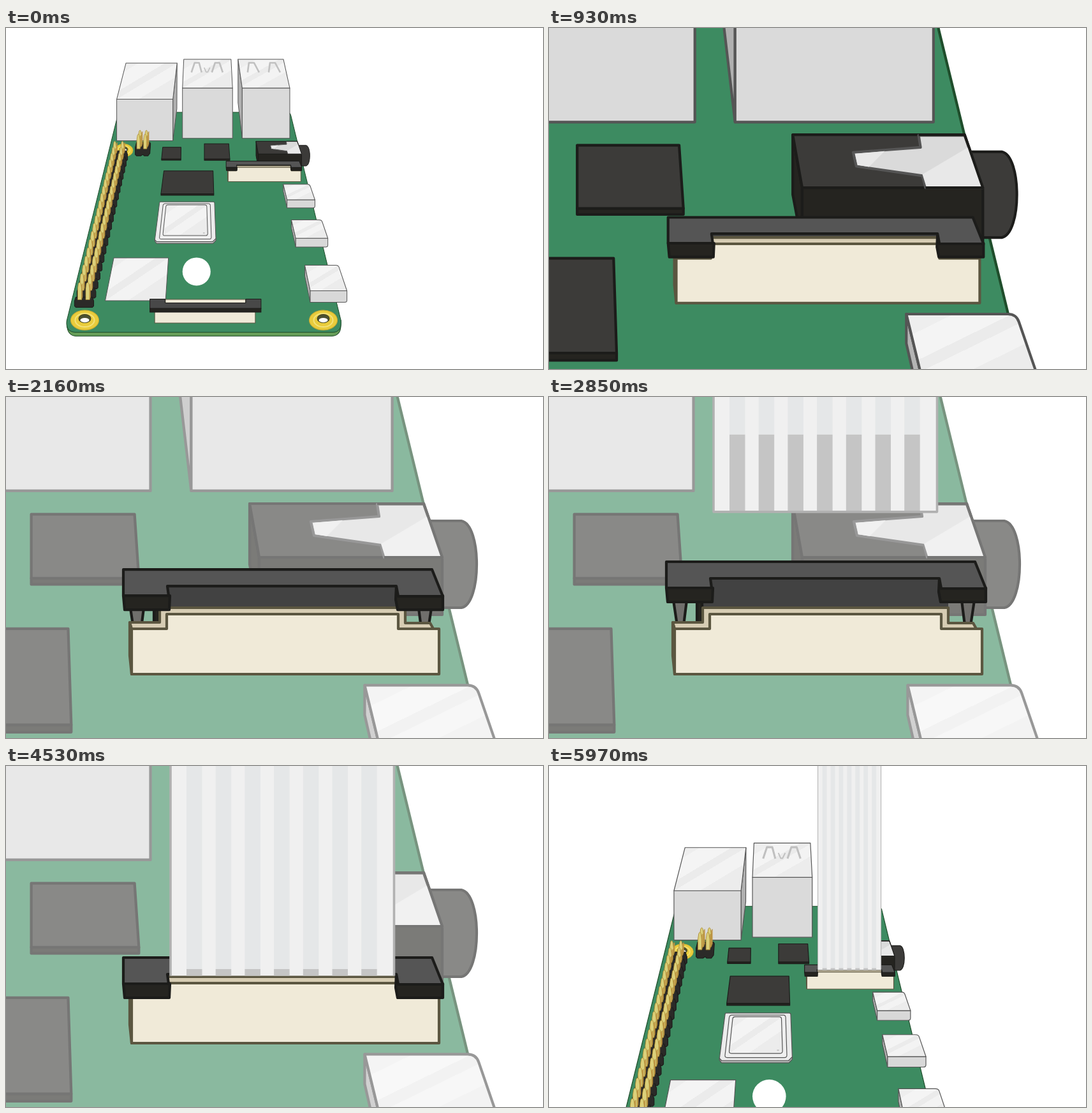
An HTML page for the animation above (6 s loop, 842 px wide and 534 px high).

```html
<!DOCTYPE html>
<html lang="en">
<head>
<meta charset="utf-8">
<title>Fitting a ribbon cable</title>
<style>
  html, body { margin: 0; width: 100%; height: 100%; overflow: hidden; background: #fff; }
  svg { display: block; width: 842px; height: 534px; }
</style>
</head>
<body>
<svg id="stage" viewBox="0 0 842 534" stroke-linejoin="round"></svg>
<script>
const GREY = '#555', BLACK = '#1c1c1a', FACE = '#3c3b39', SIDE = '#252420', OLIVE = '#5b5640';
const LOOP = 6000;

const path = (d, fill, stroke = GREY, extra = '') =>
  `<path d="${d}" fill="${fill}" stroke="${stroke}" ${extra}/>`;
const rect = (x, y, w, h, fill, extra = '') =>
  `<rect x="${x}" y="${y}" width="${w}" height="${h}" fill="${fill}" ${extra}/>`;
const ellipse = (cx, cy, rx, ry, fill, extra = '') =>
  `<ellipse cx="${cx}" cy="${cy}" rx="${rx}" ry="${ry}" fill="${fill}" ${extra}/>`;

// Groups drawn at a closer view, mapped back to board units.
const view = (scale, x, y, stroke, body) =>
  `<g transform="scale(${1 / scale}) translate(${x} ${y})" stroke-width="${stroke}">${body}</g>`;
const middle = body => view(2.194, 471.8, 215.5, 2.2, body);
const close = body => view(4.23, 1276.8, 582.8, 4.2, body);

function board() {
  const outline = 'M174 143Q177 132 183 132H440Q446 132 447 138L525 457Q527 476 512 476H109Q93 475 96 457Z';
  return path('M96 457V465Q97 481 110 482H511Q525 481 525 465V457Z', '#669d58', '#1f4d2b') +
    path(outline, '#3d8b61', '#1f4d2b');
}

function mount(x, y, size) {
  return `<g transform="translate(${x} ${y}) scale(${size})">` +
    ellipse(0, 0, 22, 15.5, '#e9cc3c', 'stroke="#cba92f"') +
    ellipse(0, 0, 15, 10.5, 'none', 'stroke="#f3e27a" stroke-width="2"') +
    ellipse(0, -2.5, 9.5, 6.5, '#4c5132', 'stroke="#3b3d20"') +
    ellipse(0, 0, 7, 3.6, '#fff') + '</g>';
}

function ports() {
  const prong = (a, b, c, d) =>
    path(`M${a} 69.5L${b} 54.5H${c}L${d} 69.5`, 'none', '#c0c0c0', 'stroke-width="2.6"');
  return path('M268.5 55L268.2 126L262 176.3V111.5Z', '#b0b0b0') +
    path('M174 111.5H262V176.3H174Z', '#dadada') +
    path('M188.5 55H268.5L262 111.5H174Z', 'url(#sheen)') +
    path('M277 94H355.4V172.5H277Z', '#dadada') +
    path('M279 49H353L355.4 94H277Z', 'url(#sheen)') +
    path('M364 49L370.5 94V172.5L364 117Z', '#b0b0b0') +
    path('M370.5 94H445V172.5H370.5Z', '#dadada') +
    path('M364 49H435L445 94H370.5Z', 'url(#sheen)') +
    prong(291, 296, 303, 307) + prong(323, 328, 335, 340) +
    path('M311 62L314 69H316.5L320 62', 'none', '#c0c0c0', 'stroke-width="1.6"') +
    prong(379, 381, 389, 397) + prong(412, 414, 422, 430);
}

function pin(x, y, w, h) {
  const r = w / 2;
  return path(`M${x + r} ${y + 4}L${x + r + 1.4} ${y + 2}V${y + h - 4}L${x + r} ${y + h}Z`, '#d5a257', '#a8862e', 'stroke-width=".5"') +
    path(`M${x - r} ${y + h}V${y + 9}L${x - r + 1} ${y + 2}Q${x} ${y - 2} ${x + r - 1} ${y + 2}L${x + r} ${y + 9}V${y + h}Z`,
      '#dcd07a', '#a8862e', 'stroke-width=".7"');
}

function header() {
  let out = '';
  for (let i = 0; i < 20; i++) {
    const u = i / 19, k = .78 * u + .22 * u * u;
    const x = 171 - 55 * k, y = 177 + 221 * k, gap = 12 + .5 * k, h = 19 + 8 * k;
    const base = y + h, left = x - 3 - 5 * k, right = x + gap + 8 + 1.5 * k;
    out += path(`M${left} ${base + 2}L${left + 2} ${base - 4}H${right - 2}L${right} ${base + 2}V${base + 10}L${right - 2} ${base + 12}H${left + 2}L${left} ${base + 10}Z`, '#2b2a28', BLACK) +
      pin(x, y, 5 + k, h) + pin(x + gap, y, 5 + k, h);
  }
  return out;
}

function smallHeader() {
  return path('M203 187L205 179H226L227 181L226 196L223 200H217L215 198L212 200H205L203 198Z', '#2b2a28', BLACK) +
    pin(210.5, 160, 5, 25) + pin(220.5, 160, 5, 25) +
    pin(208, 166, 5, 23) + pin(218.5, 166, 5, 23);
}

function chips() {
  const chip = (x1, x2, x3, x4, top, edge, bottom) =>
    path(`M${x4} ${edge}H${x3}V${bottom}H${x4}Z`, SIDE, BLACK) +
    path(`M${x1} ${top}H${x2}L${x3} ${edge}H${x4}Z`, FACE, BLACK);
  return middle(
    chip(68, 131, 130.5, 64, 194, 234, 238.5) +
    chip(211, 295, 298.5, 211, 182, 234, 239) +
    chip(72, 241, 243.5, 62, 275, 353, 359) +
    path('M41 510V516L47 524H241L250.5 514V506L240 517H47Z', '#b4b4b4') +
    path('M60 381H242Q246 381 246 385L250.5 507L240 517.5H47L41 511L57 385Q57.500 381 60 381Z', '#ececec') +
    path('M77 387H225Q231 387 231.500 393L235 502Q235 509 228 509H63Q56 509 57 502L69 394Q70 387 77 387Z', '#efefef') +
    path('M86 391.5H213Q219 391.5 219.500 397L222.500 490Q222 497 216 497H75Q68 497 69 490L79 397Q80 391.500 86 391.5Z', 'url(#sheen)') +
    ellipse(209.5, 488, 3.5, 2, '#c4c4c4'));
}

function microUsb(x, y, topRight, bend, front, mid, right, bottom, back) {
  return path(`M${x} ${y}V${back}L${front} ${bottom}V${mid}Z`, '#b4b4b4') +
    path(`M${front} ${mid}H${right}V${bottom - 3}Q${right} ${bottom} ${right - 3.5} ${bottom}H${front}Z`, '#d8d8d8') +
    path(`M${x} ${y}H${topRight}Q${bend - 1} ${y} ${bend} ${y + 3}L${right} ${mid}H${front}Z`, 'url(#sheen)');
}

function jack() {
  return close(
    path('M660 194H714C746 200 746 324 714 330H680Z', FACE, BLACK) +
    path('M382 167V262L397 341V251Z', SIDE, BLACK) +
    path('M397 251H684V341H397Z', SIDE, BLACK) +
    path('M382 167H655L684 251H397Z', FACE, BLACK) +
    path('M582 168H655L684 251H593L588 232L483 217L478 195L585 187Z', '#dadada') +
    path('M588 230L662 186L682 249H594ZM481 197L528 193L503 218L485 215Z', '#e8e8e8', 'none') +
    path('M582 167H655L684 251H593', 'none', BLACK));
}

function lowerConnector() {
  return path('M233.500 440H391V461.500H233.500Z', '#f0ead8', OLIVE) +
    path('M250 424.500H376V431H250Z', '#f0ead8', OLIVE) +
    path('M226 424H250V430H376V424H400V439H226Z', '#484848', BLACK) +
    path('M226 438.500H400V444.500H226Z', SIDE, BLACK);
}

const LATCH_BACK =
  path('M242 284H626V332H242Z', '#424242', 'none') +
  path('M195 318H216L211 358H201ZM647 318H667L661 358H652Z', '#706f6c', BLACK) +
  path('M232 318H240V358H232Z', SIDE, BLACK);

const LATCH_FRONT =
  path('M184 299H257L256 321H186Z', SIDE, BLACK) +
  path('M612 284L615 299H685V321H614L611 305Z', SIDE, BLACK) +
  path('M184 258H668L685 300H615L612 284H253L255 299H184Z', '#555', BLACK);

const HOUSING =
  path('M194 353H241V330H626V354H665L670 363H252L197 366Z', '#d6ccb3', OLIVE) +
  path('M194 353V405L197 434V363Z', '#6d6547', OLIVE) +
  path('M197 363H252V340H615V363H679V434H197Z', '#f0ead8', OLIVE);

// Drawn with its lower end at y = 0.
function cable() {
  let out = rect(258, -2200, 350.5, 2200, '#f0f0f0');
  for (let i = 0; i < 7; i++) {
    const x = 283 + 45.7 * i;
    out += rect(x, -2200, 24.5, 2079, '#e5e7e8') + rect(x, -121, 24.5, 121, '#c5c5c5');
  }
  return out + rect(258, -2200, 350.5, 2200, 'none', 'stroke="#b1b1b1" stroke-width="3.6"');
}

const stage = document.getElementById('stage');
const bands = [[0, '#eee'], [.18, '#eee'], [.18, '#f4f4f4'], [.4, '#f4f4f4'], [.4, '#ebebeb'],
  [.5, '#ebebeb'], [.5, '#f3f3f3'], [.68, '#f3f3f3'], [.68, '#ececec'], [1, '#ececec']];

stage.innerHTML = `<defs>
  <linearGradient id="sheen" x2="1" y2="1">${bands.map(([o, c]) => `<stop offset="${o}" stop-color="${c}"/>`).join('')}</linearGradient>
  <clipPath id="slot"><path d="M0 -2500H900V328.500H0Z"/></clipPath></defs>
<g id="camera">
  <g id="surroundings">
    ${board()}${mount(185, 191.5, .66)}${mount(124, 457, 1)}${mount(497.5, 457, 1)}
    ${ports()}${header()}${smallHeader()}${chips()}${jack()}
    ${microUsb(434.8, 244.5, 473, 477.1, 440.7, 268.7, 484.4, 281.4, 255.5)}
    ${microUsb(447.5, 300.2, 491.2, 495.8, 454.3, 328.9, 504.6, 342.7, 312.4)}
    ${microUsb(468.5, 371, 517, 522, 477, 411, 534.5, 429, 388)}
    ${path('M169.500 359.500H255L250.500 426.500H156Z', 'url(#sheen)')}
    ${ellipse(299, 381, 22, 22, '#fff')}${lowerConnector()}
  </g>
  ${close(`<g class="latch">${LATCH_BACK}</g>${HOUSING}<g class="latch">${LATCH_FRONT}</g>
    <g clip-path="url(#slot)"><g id="cable">${cable()}</g></g>`)}
</g>`;

const camera = document.getElementById('camera');
const surroundings = document.getElementById('surroundings');
const ribbon = document.getElementById('cable');
const latches = stage.querySelectorAll('.latch');

const mix = (a, b, k) => a + (b - a) * k;
const ramp = (t, from, to) => Math.min(1, Math.max(0, (t - from) / (to - from)));
const ease = (t, from, to) => { const k = ramp(t, from, to); return k * k * (3 - 2 * k); };

const START = [.982, 7, 3.4], NEAR = [4.23, -1276.8, -582.8], END = [1.195, -12, 62];

function draw(t) {
  const zoomIn = ease(t, -47, 1012), zoomOut = ease(t, 5370, 5970);
  const [s, x, y] = NEAR.map((v, i) => mix(mix(START[i], v, zoomIn), END[i], zoomOut));
  camera.setAttribute('transform', `translate(${x} ${y}) scale(${s})`);

  const fade = ease(t, 990, 1440) - ease(t, 5370, 5800);
  surroundings.setAttribute('opacity', 1 - .4 * fade);

  const drop = 40 - 40 * ease(t, 1800, 2370) + 42 * ease(t, 3990, 4530);
  latches.forEach(part => part.setAttribute('transform', `translate(0 ${drop})`));

  const slide = 1 - Math.pow(1 - ramp(t, 2700, 3480), 2.45);
  ribbon.setAttribute('transform', `translate(0 ${439 * slide})`);
  ribbon.setAttribute('visibility', t > 2700 ? 'visible' : 'hidden');
}

const began = performance.now();
function tick() {
  draw((performance.now() - began) % LOOP);
  requestAnimationFrame(tick);
}
draw(0);
requestAnimationFrame(tick);
</script>
</body>
</html>
```
